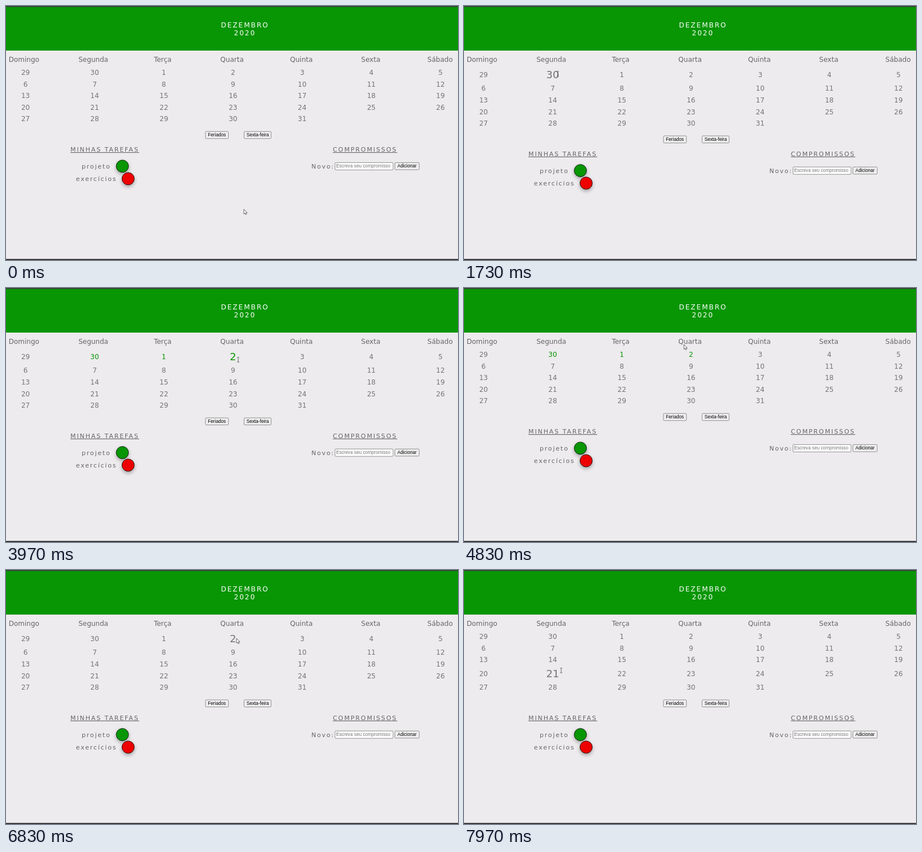
Recreate the animation shown at these times as an HTML page. Size 800 px wide and 450 px high, loop 8 s.

```html
<!DOCTYPE html>
<html lang="pt">
<head>
<meta charset="utf-8">
<title>Calendário</title>
<style>
  html, body { margin: 0; width: 100%; height: 100%; overflow: hidden; background: #edebed; }
  svg { display: block; width: 800px; height: 450px; font-family: "DejaVu Sans", sans-serif; }
  .mid { text-anchor: middle; }
  .title { font-size: 12px; letter-spacing: 2px; fill: #fff; }
  .week { font-size: 12px; fill: #666; }
  .label { font-size: 11px; letter-spacing: 1.8px; fill: #666; }
  .head { letter-spacing: 1.9px; text-decoration: underline; }
  .ui { font: 8.2px "Liberation Sans", Arial, sans-serif; }
  .box { fill: #efefef; stroke: #767676; stroke-width: .8; }
  .task { stroke: #000; stroke-width: .8; filter: drop-shadow(0 3px 3px rgba(0, 0, 0, .32)); }
</style>
</head>
<body>
<svg viewBox="0 0 800 450">
  <rect width="800" height="450" fill="#edebed"/>
  <rect y="1" width="800" height="78" fill="#089604"/>
  <rect width="800" height="1.7" fill="#3c3c3c"/>
  <rect y="448" width="800" height="2" fill="#3c3c3c"/>
  <text class="title" x="380.5" y="38">DEZEMBRO</text>
  <text class="title" x="403.5" y="52.4">2020</text>
  <g id="week" class="week mid"></g>
  <g id="days" class="mid"></g>
  <g id="lower">
    <g class="ui">
      <rect class="box" x="353" y="222.3" width="40.7" height="12.5" rx="1.5"/>
      <text x="357.3" y="231.2">Feriados</text>
      <rect class="box" x="421.4" y="222.3" width="47.8" height="12.5" rx="1.5"/>
      <text x="425.7" y="231.2">Sexta-feira</text>
      <rect class="box" x="582.4" y="277.4" width="102.6" height="13" rx="1" style="fill:#fff"/>
      <text x="584.2" y="286.3" fill="#757575">Escreva seu compromisso</text>
      <rect class="box" x="688.3" y="277.4" width="43" height="12.6" rx="1.5"/>
      <text x="692.7" y="286.3">Adicionar</text>
    </g>
    <text class="label head" x="114" y="258">MINHAS TAREFAS</text>
    <text class="label head" x="578.5" y="258">COMPROMISSOS</text>
    <text class="label" x="134" y="288">projeto</text>
    <text class="label" x="123.8" y="310.3">exercícios</text>
    <text class="label" x="540.4" y="288">Novo:</text>
    <circle class="task" cx="206" cy="283.8" r="10.9" fill="#089604"/>
    <circle class="task" cx="216.2" cy="306" r="10.9" fill="#ee0000"/>
  </g>
  <g id="cursor">
    <path id="arrow" d="M0 0V8.6L2 6.8L3.3 9.7L4.6 9.1L3.4 6.3H6Z" fill="#fff" stroke="#444" stroke-width=".8"/>
    <path id="beam" d="M-2-4.2H-.5L0-3.7L.5-4.2H2M0-3.7V3.7M-2 4.2H-.5L0 3.7L.5 4.2H2" fill="none" stroke="#555" stroke-width=".9"/>
  </g>
</svg>
<script>
const LOOP = 8000, LAG = 120, CLICK_DELAY = 180, REST = .4;
const COL = 122.4, ROW = 20.6, FIRST_X = 34.6, FIRST_Y = 117.7, GROWTH = 7.8;
const byId = id => document.getElementById(id);
const colX = col => FIRST_X + COL * col;

// Pointer stops; a click toggles the paint of the cell below
const stops = [
  { at: 0, x: 421, y: 360 },
  { at: 480, x: 305, y: 363 },
  { at: 850, x: 208, y: 293 },
  { at: 1650, x: 166, y: 120, click: true },
  { at: 2600, x: 217, y: 114 },
  { at: 2950, x: 285, y: 122, click: true },
  { at: 3600, x: 411, y: 127, click: true },
  { at: 4600, x: 390, y: 100 },
  { at: 5150, x: 180, y: 100 },
  { at: 5430, x: 175, y: 123 },
  { at: 5600, x: 163, y: 122, click: true },
  { at: 6150, x: 285, y: 121, click: true },
  { at: 6600, x: 376, y: 121, click: true },
  { at: 6830, x: 408, y: 121 },
  { at: 7800, x: 172, y: 178 }
];

function addText(parent, text, x, y) {
  const node = document.createElementNS("http://www.w3.org/2000/svg", "text");
  node.textContent = text;
  node.setAttribute("x", x);
  node.setAttribute("y", y);
  return byId(parent).appendChild(node);
}

["Domingo", "Segunda", "Terça", "Quarta", "Quinta", "Sexta", "Sábado"]
  .forEach((name, i) => addText("week", name, 31.8 + 122.75 * i, 98.9));

const days = Array.from({ length: 33 }, (_, i) =>
  addText("days", i < 2 ? 29 + i : i - 1, colX(i % 7), 0));

// Rest at each stop, then ease to the next one
function pointerAt(t) {
  const next = stops.findIndex(stop => stop.at > t);
  if (next < 0) return stops[stops.length - 1];
  const a = stops[Math.max(0, next - 1)], b = stops[next];
  const u = Math.max(0, ((t - a.at) / (b.at - a.at) - REST) / (1 - REST));
  const k = u * u * (3 - 2 * u);
  return { x: a.x + (b.x - a.x) * k, y: a.y + (b.y - a.y) * k };
}

function cellAt({ x, y }) {
  const col = Math.round((x - FIRST_X) / COL), row = Math.round((y - FIRST_Y) / ROW);
  const cell = row * 7 + col;
  return row >= 0 && cell < days.length ? cell : -1;
}

function isPainted(cell, t) {
  const clicks = stops.filter(stop =>
    stop.click && stop.at + CLICK_DELAY <= t && cellAt(stop) === cell);
  return clicks.length % 2 === 1;
}

function draw(t) {
  // The page reacts slightly after the pointer moves
  const felt = pointerAt(Math.max(0, t - LAG));
  const hover = cellAt(felt);
  const hoverRow = hover < 0 ? Infinity : Math.floor(hover / 7);

  days.forEach((node, i) => {
    const row = Math.floor(i / 7), size = i === hover ? 18 : 12;
    const shift = row > hoverRow ? GROWTH : row === hoverRow ? GROWTH / 2 : 0;
    node.setAttribute("y", FIRST_Y + ROW * row + shift + size * .365);
    node.setAttribute("font-size", size);
    node.setAttribute("fill", isPainted(i, t) ? "#089604" : "#757575");
  });
  byId("lower").setAttribute("transform", `translate(0 ${hover < 0 ? 0 : GROWTH})`);

  const { x, y } = pointerAt(t);
  const overText = hover >= 0 && Math.abs(felt.x - colX(hover % 7)) < 17;
  byId("cursor").setAttribute("transform", `translate(${x} ${y})`);
  byId("beam").style.display = overText ? "" : "none";
  byId("arrow").style.display = overText ? "none" : "";
}

const start = performance.now();
function tick() {
  draw((performance.now() - start) % LOOP);
  requestAnimationFrame(tick);
}
tick();
</script>
</body>
</html>
```
